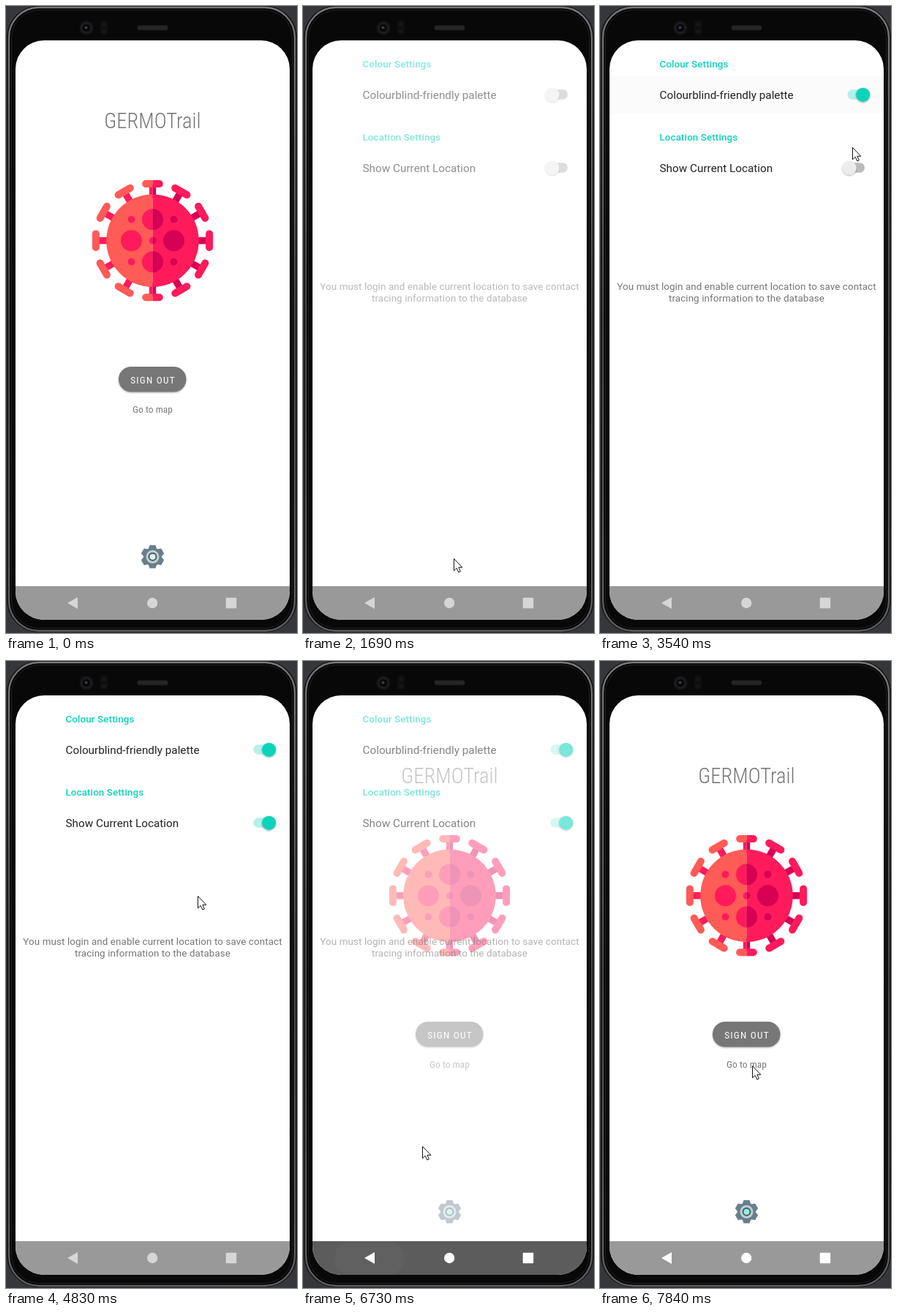
Recreate the animation shown at these times as an HTML page. Size 398x857 px, loop 8000 ms.

```html
<!DOCTYPE html>
<html lang="en">
<head>
<meta charset="utf-8">
<title>Settings walkthrough</title>
<style>
  html, body { margin: 0; width: 100%; height: 100%; overflow: hidden; background: #36373a; }
  svg { display: block; width: 398px; height: 857px; font-family: Roboto, sans-serif; }
  .condensed { font-family: "Roboto Condensed", Roboto, sans-serif; font-stretch: 75%; text-anchor: middle; }
  .heading { font-size: 13.4px; font-weight: 500; letter-spacing: .1px; fill: #0dd3bb; }
  .option { font-size: 15.3px; fill: #222; }
  .note { font-size: 13.4px; letter-spacing: .1px; fill: #757575; text-anchor: middle; }
</style>
</head>
<body>
<svg viewBox="0 0 398 857">
  <defs>
    <clipPath id="screen"><rect x="13" y="47" width="375" height="792" rx="39"/></clipPath>
    <clipPath id="leftHalf"><rect x="-90" y="-90" width="90" height="180"/></clipPath>
    <clipPath id="rightHalf"><rect y="-90" width="90" height="180"/></clipPath>
    <linearGradient id="edge" x2="0" y2="1">
      <stop offset="0" stop-color="#77787a"/><stop offset=".3" stop-color="#5a5b5d"/>
      <stop offset=".5" stop-color="#444547"/><stop offset="1" stop-color="#5f6062"/>
    </linearGradient>
    <filter id="shadow" x="-30%" y="-30%" width="160%" height="170%">
      <feDropShadow dx="0" dy="1" stdDeviation="1" flood-opacity=".35"/>
    </filter>
  </defs>

  <rect width="398" height="857" fill="#36373a"/>
  <rect x="1.5" y="0" width="396" height="855.5" rx="43" fill="#0a0a0b" stroke="#1c1c1e"/>
  <rect x="4" y="2" width="391" height="852" rx="41" fill="#050506" stroke="url(#edge)" stroke-width="2.4"/>
  <rect x="7.5" y="5.5" width="384" height="845" rx="38" fill="#080809" stroke="#222224"/>
  <circle cx="110" cy="30" r="9.5" fill="#171718"/>
  <circle cx="110" cy="30" r="6" fill="#08080b" stroke="#262629"/>
  <circle cx="109.5" cy="29.5" r="2" fill="#3c3c46"/>
  <rect x="129.5" y="20" width="9" height="19" rx="3" fill="#0d0d0e" stroke="#121213"/>
  <circle cx="134" cy="25" r="3" fill="#161617"/><circle cx="134" cy="34.5" r="3" fill="#161617"/>
  <rect x="179.5" y="26.5" width="42" height="6.5" rx="3" fill="#252526" stroke="#151516"/>

  <g clip-path="url(#screen)">
    <rect x="13" y="47" width="375" height="792" fill="#fff"/>

    <g id="home">
      <text class="condensed" x="200.5" y="167" font-size="28.6" font-weight="300" fill="#757575">GERMOTrail</text>
      <g id="virus" transform="translate(200.5 320.7)"></g>
      <rect x="154" y="493" width="92.5" height="34.5" rx="17.2" fill="#777" filter="url(#shadow)"/>
      <text class="condensed" x="201" y="515.5" font-size="13.4" letter-spacing="1.2" fill="#fff">SIGN OUT</text>
      <text class="condensed" x="200.5" y="555.5" font-size="13.5" fill="#7a7a7a">Go to map</text>
      <g id="gear" transform="translate(200.5 752.8)">
        <circle r="12.4" fill="#687f8c"/>
        <circle r="9" fill="#c6d0d4"/>
        <circle id="hub" r="5" stroke="#50646e" stroke-width="2.2"/>
      </g>
    </g>

    <g id="settings">
      <rect id="row0" x="13" y="96" width="375" height="51"/>
      <rect id="row1" x="13" y="196" width="375" height="51"/>
      <text class="heading" x="81.5" y="84.2">Colour Settings</text>
      <text class="option" x="81.5" y="127.3">Colourblind-friendly palette</text>
      <text class="heading" x="81.5" y="184.4">Location Settings</text>
      <text class="option" x="81.5" y="227.3">Show Current Location</text>
      <text class="note" x="200.5" y="388">You must login and enable current location to save contact</text>
      <text class="note" x="200.5" y="403.8">tracing information to the database</text>
      <g id="toggles"></g>
    </g>

    <rect id="nav" x="13" y="793" width="375" height="46"/>
    <rect id="navRipple" y="793" height="46" rx="23" fill="#fff"/>
    <g id="navIcons">
      <path d="M84 816L98 808V824Z"/>
      <circle cx="200.2" cy="816" r="7.2"/>
      <rect x="300.7" y="808.7" width="14.5" height="14.5" rx="1"/>
    </g>
  </g>

  <g id="pointer">
    <circle id="press" r="12" fill="#e6f02c" opacity=".6"/>
    <path d="M.5 .5V16.8L4.2 13.3L6.8 19L9.4 17.9L6.9 12.3H11.8Z" fill="#fff" stroke="#111"/>
  </g>
</svg>
<script>
const LOOP = 8000;
const byId = id => document.getElementById(id);
const clamp = v => Math.min(1, Math.max(0, v));
const mix = (a, b, p) => a + (b - a) * p;
const ramp = (t, start, end) => clamp((t - start) / (end - start));
const smooth = (t, start, end) => { const p = ramp(t, start, end); return p * p * (3 - 2 * p); };
const within = (t, start, end) => t >= start && t < end;
const gray = v => `rgb(${v},${v},${v})`;
const blend = (a, b, p) => `rgb(${a.map((v, i) => Math.round(mix(v, b[i], p)))})`;

const easeInOut = p => p * p * (3 - 2 * p);
const easeIn = p => p ** 1.5;
const easeOut = p => 1 - (1 - p) ** 2.5;

// Pointer moves: start, end, from x, from y, to x, to y, easing
const moves = [
  [140, 720, 328, 860, 206, 755, easeInOut],
  [2120, 2520, 206, 755, 342, 150, easeInOut],
  [2640, 2800, 342, 150, 341, 124, easeInOut],
  [3180, 3755, 341, 124, 347, 224, easeInOut],
  [4620, 5030, 347, 224, 185, 409, easeInOut],
  [5310, 5780, 185, 409, 88, 826, easeInOut],
  [6460, 6730, 88, 826, 163, 663, easeIn],
  [6730, 7420, 163, 663, 208, 553, easeOut]
];
const presses = [[950, 1090], [2980, 3120], [3910, 4090], [5890, 6030], [7650, 7790]];
const switches = [3110, 4090];

function pointerAt(t) {
  const [start, end, x0, y0, x1, y1, ease] = moves.findLast(m => t >= m[0]) || moves[0];
  const p = ease(ramp(t, start, end));
  return [mix(x0, x1, p), mix(y0, y1, p)];
}

function virusHalf(side, main, accent) {
  let spikes = "";
  for (let angle = 0; angle < 360; angle += 30)
    spikes += `<g transform="rotate(${angle})"><rect x="-4.7" y="-76" width="9.4" height="18" fill="${accent}"/>
      <rect x="-14.3" y="-82.6" width="28.6" height="10" rx="5" fill="${main}"/></g>`;
  const spot = (x, y, r) => `<circle cx="${x}" cy="${y}" r="${r}" fill="${accent}"/>`;
  const big = [[0, -29], [0, 29], [-29, 0], [29, 0]].map(([x, y]) => spot(x, y, 14.5));
  const small = [[0, 0], [-29, -29], [29, -29], [-29, 29], [29, 29]].map(([x, y]) => spot(x, y, 4.9));
  return `<g clip-path="url(#${side})">${spikes}<circle r="63.3" fill="${main}"/>${big.join("")}${small.join("")}</g>`;
}

byId("virus").innerHTML = virusHalf("leftHalf", "#ff5b57", "#ff1a5b") + virusHalf("rightHalf", "#ff1a5b", "#d60055");

let teeth = "";
for (let angle = 0; angle < 360; angle += 60)
  teeth += `<path d="M-6 -10L-4 -15.8H4L6 -10Z" fill="#687f8c" transform="rotate(${angle})"/>`;
byId("gear").insertAdjacentHTML("afterbegin", teeth);

byId("toggles").innerHTML = [121, 221].map(y =>
  `<rect x="338.5" y="${y - 6.7}" width="23.5" height="13.4" rx="6.7"/>
   <circle cy="${y + .3}" r="9.6" filter="url(#shadow)"/>`).join("");
const tracks = [...byId("toggles").querySelectorAll("rect")];
const thumbs = [...byId("toggles").querySelectorAll("circle")];

function drawSwitch(i, t) {
  const start = switches[i];
  const on = smooth(t, start, start + 240);
  thumbs[i].setAttribute("cx", mix(341, 359.7, on));
  thumbs[i].setAttribute("fill", blend([236, 236, 236], [13, 211, 187], on));
  tracks[i].setAttribute("fill", blend([188, 188, 188], [182, 240, 233], on));
  const glow = ramp(t, start, start + 70) * (1 - ramp(t, start + 90, start + 520));
  byId("row" + i).setAttribute("opacity", .08 * glow);
}

function navShade(t) {
  if (within(t, 1270, 1600)) return mix(92, 153, ramp(t, 1270, 1600));
  if (within(t, 6180, 7100)) return mix(153, 92, ramp(t, 6180, 6450));
  return 153;
}

function draw(t) {
  byId("home").setAttribute("opacity", t < 4000 ? 1 - smooth(t, 1270, 1600) : smooth(t, 6440, 7090));
  byId("settings").setAttribute("opacity", t < 4000 ? smooth(t, 1350, 2020) : 1 - smooth(t, 6490, 7010));
  byId("hub").setAttribute("fill", t > 4000 ? "#8ff2df" : "#def3ec");
  drawSwitch(0, t);
  drawSwitch(1, t);

  byId("nav").setAttribute("fill", gray(Math.round(navShade(t))));
  byId("navIcons").setAttribute("fill", t < 5900 ? "#d6d6d6" : "#fff");
  const spread = mix(20, 48, smooth(t, 5900, 6120));
  byId("navRipple").setAttribute("x", 91 - spread);
  byId("navRipple").setAttribute("width", spread * 2);
  byId("navRipple").setAttribute("opacity", .15 * ramp(t, 5900, 5980) * (1 - ramp(t, 6050, 6850)));

  byId("pointer").setAttribute("transform", `translate(${pointerAt(t).map(Math.round)})`);
  byId("press").style.display = presses.some(([a, b]) => within(t, a, b)) ? "" : "none";
}

const began = performance.now();
function tick() {
  draw((performance.now() - began) % LOOP);
  requestAnimationFrame(tick);
}
tick();
</script>
</body>
</html>
```
